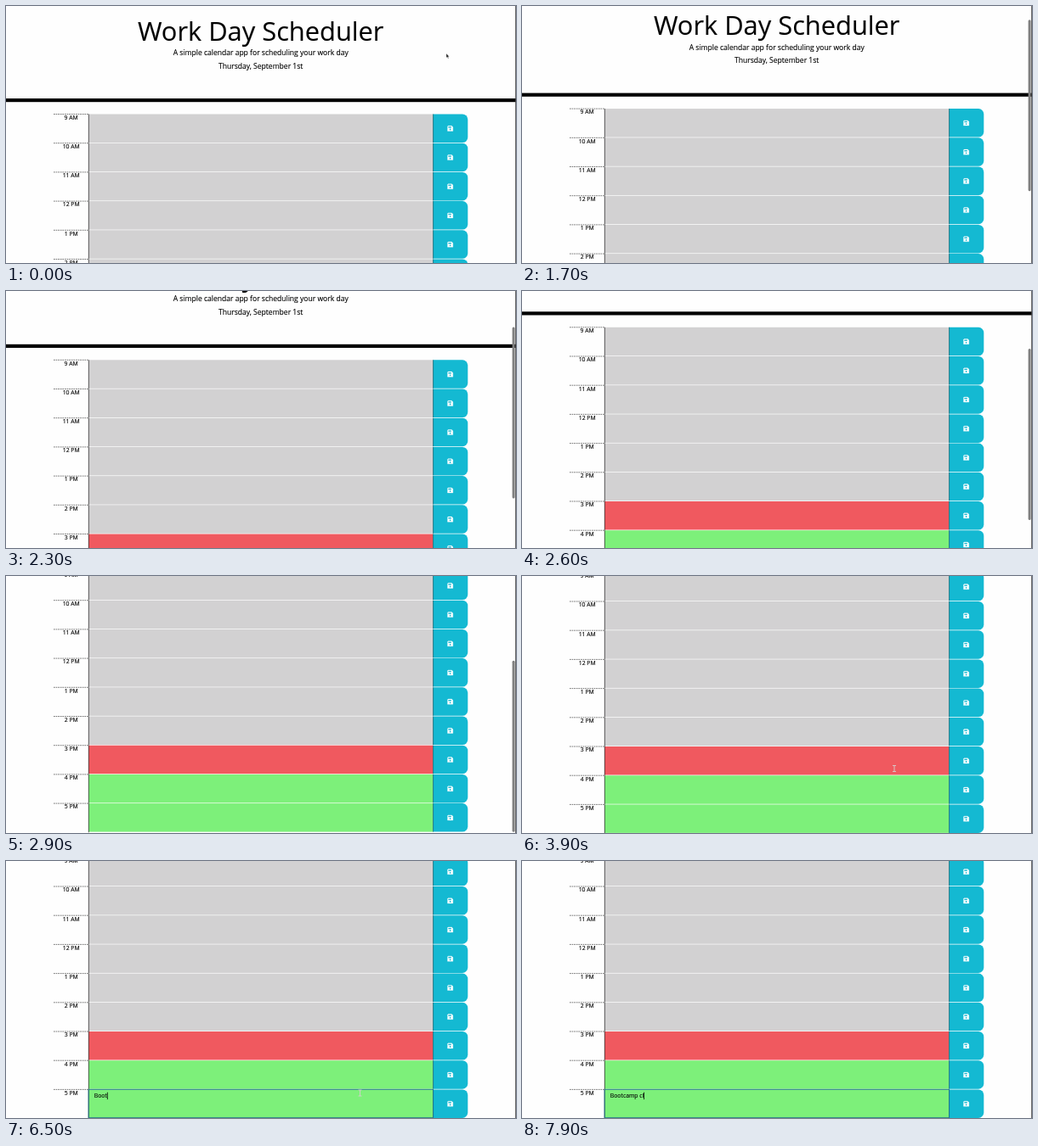
An HTML page for the animation above (8 s loop, 600 by 303 pixels).

```html
<!DOCTYPE html>
<html lang="en">
<head>
<meta charset="utf-8">
<title>Work Day Scheduler</title>
<style>
html, body { margin: 0; width: 100%; height: 100%; overflow: hidden; background: #fefefe; }
svg { display: block; width: 600px; height: 303px; font: 6.84px "Open Sans", sans-serif; }
text { stroke: #000; stroke-width: .12px; }
.mid { text-anchor: middle; }
#note { white-space: pre; }
</style>
</head>
<body>
<svg viewBox="0 0 600 303">
  <g id="page">
    <g class="mid">
      <text x="299.7" y="40.7" font-size="30.8">Work Day Scheduler</text>
      <text x="299.7" y="58" font-size="8.55">A simple calendar app for scheduling your work day</text>
      <text x="299.7" y="73.8" font-size="8.55">Thursday, September 1st</text>
    </g>
    <rect y="109" width="600" height="4.2"/>
    <g id="rows"></g>
    <rect id="focus" x="97.1" y="401" width="405.4" height="33.4" fill="none" stroke="#23788a"/>
    <text id="note" x="103.8" y="411"></text>
    <rect id="caret" y="404.4" width=".8" height="8.4"/>
  </g>
  <rect id="thumb" x="595.6" width="3" height="202" rx="1.5" fill="#808080"/>
  <rect x="599.2" width=".8" height="303" fill="#444"/>
  <path id="arrow" d="M0 0V5L1.2 4.1L2 6L2.8 5.6L2 3.8H3.5Z" fill="#222" stroke="#fff" stroke-width=".3"/>
  <path id="beam" d="M-2-3.5H2M0-3.5V3.5M-2 3.5H2" fill="none" stroke="#d5cfcf" stroke-width=".9"/>
</svg>
<script>
const $ = id => document.getElementById(id);
const LOOP = 8000, STEP = 100, TOP = 127.5, PITCH = 34.2;
const TEXT = "Bootcamp cl";

// progress from 0 to 1 between two times
const ramp = (t, from, to) => Math.min(1, Math.max(0, (t - from) / (to - from)));
const show = (id, opacity) => $(id).setAttribute("opacity", +opacity);
const move = (id, x, y) => $(id).setAttribute("transform", `translate(${x} ${y})`);

function row(i) {
  const hour = 9 + i;
  const label = `${(hour - 1) % 12 + 1} ${hour < 12 ? "AM" : "PM"}`;
  const fill = hour < 15 ? "#d2d1d2" : hour === 15 ? "#f0595f" : "#7df07a";
  return `<g transform="translate(0 ${TOP + i * PITCH})">
    <path d="M56 0H97" stroke="#555" stroke-width=".8" stroke-dasharray="1.7 .9"/>
    <text class="mid" x="76.7" y="6.3">${label}</text>
    <rect x="97" width="405.5" height="33.5" fill="${fill}"/>
    <path d="M97.3 0V34.2" stroke="#333" stroke-width=".8"/>
    <path d="M502.5 0H537a6.3 6.3 0 0 1 6.3 6.3V27.2a6.3 6.3 0 0 1 -6.3 6.3H502.5Z" fill="#14b9d2"/>
    <path d="M502.6 0V33.5" stroke="#17646f" stroke-width=".8"/>
    <path d="M520.1 13.8H524.4L525.8 15.2V19.9H519.5V14.4Z" fill="#fff" stroke="#fff" stroke-width=".3" stroke-linejoin="round"/>
    <rect x="520.4" y="14.7" width="3.4" height="1.4" fill="#14b9d2"/>
    <circle cx="522.6" cy="18" r=".9" fill="#14b9d2"/>
  </g>`;
}

$("rows").innerHTML = Array.from({ length: 9 }, (_, i) => row(i)).join("");

function draw(now) {
  const t = Math.floor(now % LOOP / STEP) * STEP;

  // a nudge, an accelerating flick, then a small bounce back
  const scroll = 6.4 * ramp(t, 1500, 1700) + 126.6 * ramp(t, 1700, 2900) ** 1.67
    - 1.3 * ramp(t, 2900, 3300);
  move("page", 0, -scroll);
  $("thumb").setAttribute("y", 12 + scroll * .66);
  show("thumb", t < 1600 ? 0 : 1 - ramp(t, 3400, 3800));

  const glide = ramp(t, 900, 1400), toField = ramp(t, 4200, 4700);
  const x = 518 - 80 * glide - 21.5 * toField;
  const y = 56 + 124 * glide + 47 * ramp(t, 3400, 3800) + 46.5 * toField;
  const overField = y > TOP;
  move("arrow", x, y);
  move("beam", x, y);
  show("arrow", !overField);
  show("beam", overField && (t < 1500 || t >= 3400) && t < 6700);

  // first letter, a pause, then a steady pace
  const typed = t < 5500 ? 0 : 1 + Math.max(0, Math.floor((t - 5800) / 200));
  $("note").textContent = TEXT.slice(0, typed);
  $("caret").setAttribute("x", 103.8 + $("note").getComputedTextLength());
  show("caret", t >= 4800 && (t < 5100 || t >= 5500));
  show("focus", t >= 4800);
  requestAnimationFrame(draw);
}
requestAnimationFrame(draw);
</script>
</body>
</html>
```
